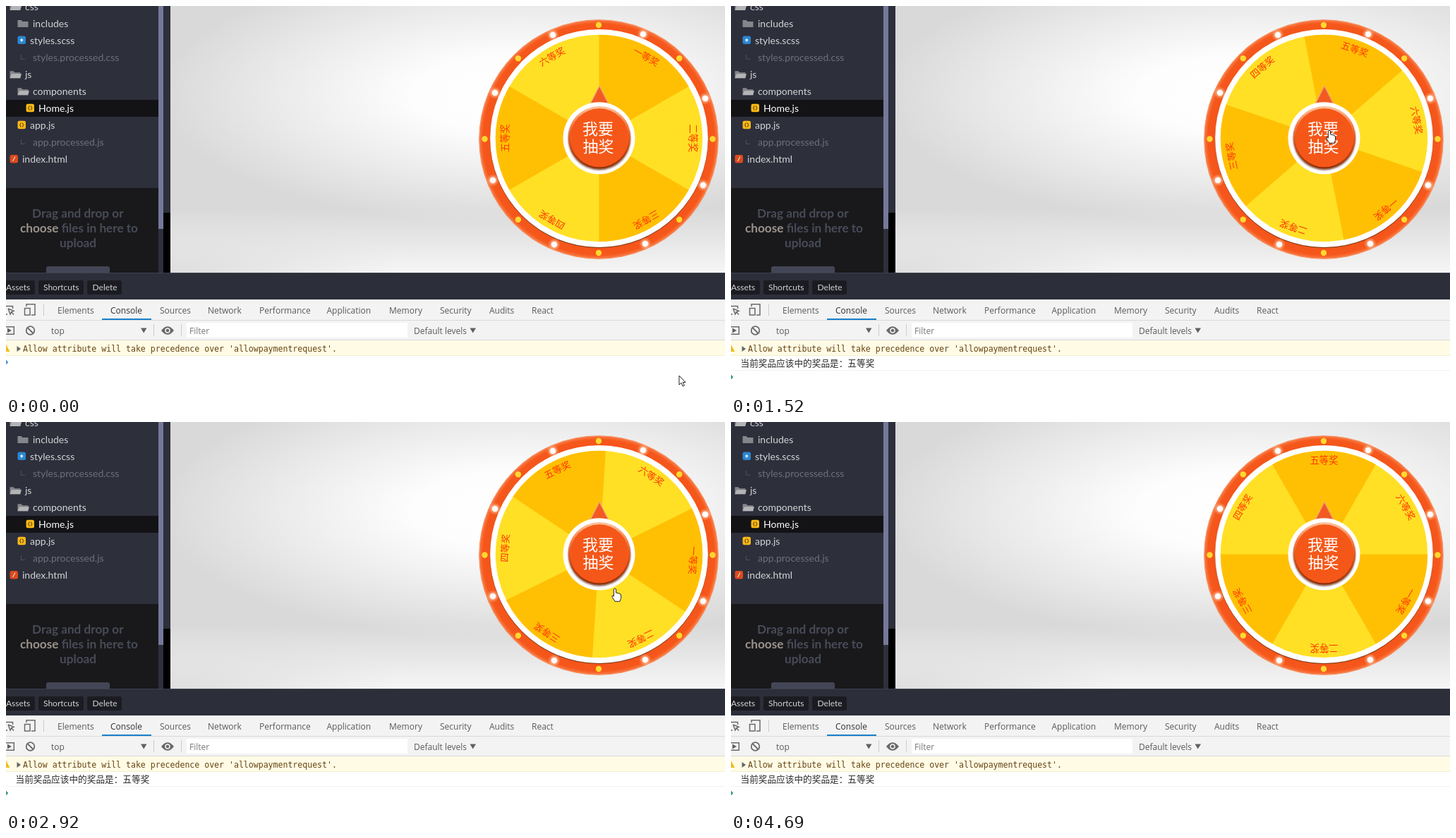
An HTML page that plays this animation: 1019 px wide and 550 px high, repeating every 4760 ms.

```html
<!DOCTYPE html>
<html lang="zh">
<head>
<meta charset="utf-8">
<title>Prize wheel</title>
<style>
html, body { margin: 0; width: 100%; height: 100%; overflow: hidden; background: #fff; }
svg { display: block; width: 1019px; height: 550px; }
.lato { font-family: Lato, sans-serif; font-size: 14px; fill: #d3d3d6; }
.dim { fill: #6d707c; }
.small { font-size: 12px; }
.drop { font-size: 17.2px; font-weight: 700; fill: #484b58; }
.ui { font: 12px "Open Sans", sans-serif; fill: #5a5a5a; }
.mono { font: 11.55px "DejaVu Sans Mono", monospace; fill: #664411; }
.cjk { font-family: "Noto Sans CJK SC", "Noto Sans CJK", sans-serif; }
</style>
</head>
<body>
<svg id="stage" viewBox="0 0 1019 550" xmlns="http://www.w3.org/2000/svg">
  <defs>
    <radialGradient id="wall" gradientUnits="userSpaceOnUse" cx="0" cy="0" r="1"
      gradientTransform="translate(730 125) scale(515 185)">
      <stop offset="0" stop-color="#fff"/><stop offset=".3" stop-color="#fdfdfd"/>
      <stop offset=".7" stop-color="#e9e9e9"/><stop offset="1" stop-color="#d9d9d9"/>
    </radialGradient>
    <linearGradient id="floor" x2="0" y2="1">
      <stop offset="0" stop-color="#f4f4f4" stop-opacity="0"/>
      <stop offset="1" stop-color="#f6f6f6"/>
    </linearGradient>
    <radialGradient id="corner" gradientUnits="userSpaceOnUse" cx="0" cy="0" r="1"
      gradientTransform="translate(233 378) scale(330 90)">
      <stop offset="0" stop-color="#dedede"/>
      <stop offset="1" stop-color="#dedede" stop-opacity="0"/>
    </radialGradient>
    <radialGradient id="rim" gradientUnits="userSpaceOnUse" cx="840" cy="189" r="170">
      <stop offset=".9" stop-color="#f4541a"/><stop offset=".965" stop-color="#f6571b"/>
      <stop offset="1" stop-color="#f8834f"/>
    </radialGradient>
    <radialGradient id="glow">
      <stop offset="0" stop-color="#fff"/><stop offset=".4" stop-color="#fff" stop-opacity=".9"/>
      <stop offset=".55" stop-color="#ffd9b8" stop-opacity=".5"/>
      <stop offset="1" stop-color="#ffb080" stop-opacity="0"/>
    </radialGradient>
    <linearGradient id="edge" x2="0" y2="1">
      <stop offset="0" stop-color="#ffc49c"/><stop offset=".3" stop-color="#f77a43"/>
      <stop offset=".7" stop-color="#c9450f"/><stop offset="1" stop-color="#8c310a"/>
    </linearGradient>
    <filter id="soft"><feGaussianBlur stdDeviation="1.3"/></filter>
  </defs>

  <g id="page">
    <rect x="233" width="786" height="378" fill="url(#wall)"/>
    <rect x="233" y="288" width="786" height="90" fill="url(#floor)"/>
    <rect x="233" y="288" width="786" height="90" fill="url(#corner)"/>
  </g>

  <g id="sidebar">
    <rect width="233" height="378" fill="#2d2f3b"/>
    <rect y="133" width="216" height="24" fill="#131316"/>
    <rect y="258" width="216" height="120" fill="#19191b"/>
    <rect x="216" width="7" height="316" fill="#74789a"/>
    <rect x="223" y="293" width="10" height="85" fill="#000"/>
    <rect x="57" y="369" width="90" height="12" rx="3" fill="#434656"/>
    <g class="lato drop">
      <text x="37" y="300">Drag and drop or</text>
      <text x="20" y="321"><tspan fill="#9b938d">choose</tspan> files in here to</text>
      <text x="76" y="342">upload</text>
    </g>
  </g>

  <g id="toolbar">
    <rect y="378" width="1019" height="38" fill="#2c2e3a"/>
    <path d="M0 378.5H1019" stroke="#3f414d"/>
  </g>

  <g id="devtools">
    <rect y="416" width="1019" height="134" fill="#fff"/>
    <rect y="416" width="1019" height="58" fill="#f3f3f3"/>
    <path d="M0 445.5H1019M0 473.5H1019" stroke="#d8d8d8"/>
    <path d="M53.5 422V439M209.5 451V468M248.5 451V468" stroke="#ccc"/>
    <rect x="136" y="443" width="70" height="2" fill="#1b7fcc"/>
    <rect x="256" y="449" width="313" height="21" fill="#fff"/>
    <g fill="none" stroke="#6a6a6a" stroke-width="1.5">
      <path d="M0 425.5H9.5V429M0 437H2"/>
      <path d="M3 429L11 432.2L7.6 433.8L11 437.5M3 429L6 437L7.6 433.8"/>
      <path d="M29 426V422.8H41V438H36M26.5 428.5H34V438H26.5Z"/>
      <circle cx="34.5" cy="460" r="5.8" stroke-width="1.8"/>
      <path d="M30.5 456L38.5 464" stroke-width="1.8"/>
      <path d="M0 454.7H11.3V465.3H0"/>
      <path d="M221 460Q229 450 237 460Q229 470 221 460Z" fill="#6a6a6a"/>
      <circle cx="229" cy="460" r="3" fill="#6a6a6a" stroke="#f3f3f3"/>
    </g>
    <path d="M2 456.5L8 460L2 463.5ZM191 456.5H199.5L195.2 463.5ZM657.5 456.5H666L661.7 463.5Z" fill="#606060"/>
    <text class="ui" x="64" y="465">top</text>
    <text class="ui" x="260" y="465" style="fill:#777">Filter</text>
    <text class="ui" x="578" y="464.5">Default levels</text>
    <rect y="474" width="1019" height="21" fill="#fffbe5"/>
    <path d="M0 495.5H1019" stroke="#f4efcf"/>
    <path d="M0 480L5.5 490H-5Z" fill="#f3bb1c"/>
    <path d="M15.5 482L21 486L15.5 490Z" fill="#666"/>
    <text class="mono" x="24" y="490">Allow attribute will take precedence over 'allowpaymentrequest'.</text>
    <g id="log">
      <text class="cjk" x="13.5" y="510.5" font-size="12.67" fill="#2a2a2a">当前奖品应该中的奖品是：五等奖</text>
      <path d="M0 516.5H1019" stroke="#f0f0f0"/>
    </g>
    <path id="prompt" d="M-1 -3L2 0L-1 3" fill="none" stroke-width="1.6"/>
  </g>

  <g id="frame">
    <circle cx="840" cy="189" r="169.8" fill="url(#rim)"/>
    <circle cx="840" cy="189" r="169" fill="none" stroke="#f99a6c" stroke-opacity=".7"/>
    <circle cx="840.5" cy="188.5" r="154.4" fill="#74340f"/>
    <circle cx="840.5" cy="187.5" r="154.4" fill="#fff"/>
  </g>
  <g id="wheel"></g>
  <g id="button">
    <path d="M841 113.5L853.5 138H828.5Z" fill="#f25a22" stroke="#f0a184" stroke-width="1.2"/>
    <circle cx="840.5" cy="187.3" r="51" fill="#fff"/>
    <circle cx="841" cy="188.5" r="44.2" fill="#6b2c10" opacity=".75" filter="url(#soft)"/>
    <circle cx="841" cy="186.3" r="44.2" fill="url(#edge)"/>
    <circle cx="841" cy="186.8" r="41.5" fill="#f55718"/>
    <g class="cjk" font-size="22" fill="#fff" text-anchor="middle">
      <text x="839" y="181.5">我要</text>
      <text x="839.5" y="207">抽奖</text>
    </g>
  </g>
  <path id="arrow" d="M0 0V13L3 10.2L5.2 15L7.4 14L5.2 9.4H9Z" fill="#fff" stroke="#222"/>
  <path id="hand" d="M-1.6 1Q0 -1 1.6 1V6L6 7Q8.6 7.6 8.6 10V13.5L7 18.3H0L-4 12Q-4.4 9.6 -2.6 10L-1.6 11.2Z" fill="#fff" stroke="#222"/>
</svg>

<script>
const LOOP = 4760, START = 750, STEP = 77.25, TURN = 810;
const $ = id => document.getElementById(id);

function add(parent, tag, attrs, text) {
  const el = document.createElementNS('http://www.w3.org/2000/svg', tag);
  for (const name in attrs) el.setAttribute(name, attrs[name]);
  if (text) el.textContent = text;
  $(parent).appendChild(el);
  return el;
}

// File tree: label, x, icon kind
const files = [
  ['css', 27, 'open'], ['includes', 38, 'folder'], ['styles.scss', 34, 'style'],
  ['styles.processed.css', 38, 'child'], ['js', 27, 'open'], ['components', 38, 'open'],
  ['Home.js', 46, 'script'], ['app.js', 34, 'script'],
  ['app.processed.js', 38, 'child'], ['index.html', 23, 'markup']
];
const badges = {
  style: ['#2b86cf', '#fff', 'M-2 -1L2 1M-2 1L2 -1M0 -2.5V2.5'],
  script: ['#fab817', '#3a2c00', 'M-1 -3Q-4 0 -1 3M1 -3Q4 0 1 3'],
  markup: ['#db4a1d', '#fff', 'M1.7 -3.2L-1.7 3.2']
};
files.forEach(([label, x, kind], i) => {
  const y = 1 + i * 24.05;
  if (badges[kind]) {
    const [fill, stroke, d] = badges[kind], left = x - 17.5;
    add('sidebar', 'rect', { x: left, y: y - 6.5, width: 11.5, height: 11.5, rx: 2.5, fill });
    add('sidebar', 'path', { d, stroke, fill: 'none', transform: `translate(${left + 5.7} ${y - .7})` });
  } else if (kind === 'child') {
    add('sidebar', 'path', { d: `M21.5 ${y - 4}V${y + 2}H27`, fill: 'none', stroke: '#50535f' });
  } else {
    const left = x - 21.5;
    add('sidebar', 'path', { d: `M${left} ${y + 5}v-10h5l2 2h8v8z`, fill: '#85868b' });
    if (kind === 'open')
      add('sidebar', 'path', { d: `M${left} ${y + 5}l2.5 -6h14l-2 6z`, fill: '#b4b4b7' });
  }
  const tone = kind === 'child' ? ' dim' : '';
  const el = add('sidebar', 'text', { x, y: y + 5, class: 'lato' + tone }, label);
  if (label === 'Home.js') el.style.fill = '#fff';
});

[['Assets', -6, 47, 0], ['Shortcuts', 46, 64, 53], ['Delete', 115, 49, 122.5]].forEach(([label, x, width, tx]) => {
  add('toolbar', 'rect', { x, y: 389, width, height: 20, rx: 2, fill: '#1b1c21' });
  add('toolbar', 'text', { x: tx, y: 403, class: 'lato small' }, label);
});

[['Elements', 73], ['Console', 148], ['Sources', 218], ['Network', 286], ['Performance', 359],
 ['Application', 454.5], ['Memory', 543], ['Security', 615], ['Audits', 685], ['React', 745]]
  .forEach(([label, x]) => {
    const el = add('devtools', 'text', { x, y: 436, class: 'ui' }, label);
    if (label === 'Console') el.style.fill = '#333';
  });

for (let i = 0; i < 8; i++) {
  const a = i * Math.PI / 4;
  add('frame', 'circle', { cx: 840 + 161.5 * Math.sin(a), cy: 188.5 - 161.5 * Math.cos(a), r: 4.2, fill: '#ffd92e' });
}
[[775, 41], [903, 40], [693, 123], [991, 131], [690, 247], [988, 254], [777, 338], [906, 337]]
  .forEach(([cx, cy]) => {
    add('frame', 'circle', { cx, cy, r: 9, fill: 'url(#glow)' });
    add('frame', 'circle', { cx, cy, r: 3.8, fill: '#fff' });
  });

const R = 146.7, half = R / 2, high = R * Math.sqrt(3) / 2;
add('wheel', 'circle', { r: R, fill: '#ffe025' });
[...'一二三四五六'].forEach((rank, i) => {
  if (i % 2 === 0)
    add('wheel', 'path', {
      d: `M0 0V${-R}A${R} ${R} 0 0 1 ${high} ${-half}Z`, fill: '#ffc004', transform: `rotate(${i * 60})`
    });
  add('wheel', 'text', {
    y: -128.6, class: 'cjk', 'font-size': 13.3, 'text-anchor': 'middle',
    fill: '#ff3600', transform: `rotate(${i * 60 + 30})`
  }, rank + '等奖');
});

// Linear interpolation over rows of [time, ...values]
function track(rows, t) {
  let i = 1;
  while (i < rows.length - 1 && rows[i][0] < t) i++;
  const a = rows[i - 1], b = rows[i];
  const k = Math.min(1, Math.max(0, (t - a[0]) / (b[0] - a[0])));
  return a.slice(1).map((v, n) => v + (b[n + 1] - v) * k);
}

// The remaining turn is the fourth power of this value
const spin = [[750, 1], [1059, .9241], [1522.5, .8055], [2295, .562], [2913, .4245], [3453.75, .2933], [4685, 0]];
const approach = [[0, 954, 524], [125, 937, 440], [180, 905, 325], [235, 870, 225], [290, 848, 176]];
const leave = [[2836, 848, 176], [2913, 863, 236], [3067, 932, 368], [3222, 966, 488], [3376, 950, 523], [3453, 946, 542]];

function place(id, x, y, visible) {
  $(id).setAttribute('transform', `translate(${x} ${y})`);
  $(id).setAttribute('visibility', visible ? 'visible' : 'hidden');
}

function draw(time) {
  const clicked = time >= START;
  const t = clicked
    ? START + STEP * Math.floor((time - START) / STEP + .2)
    : time < 70 ? 0 : Math.min(290, 70 + 55 * Math.floor((time - 70) / 55));

  const [left] = track(spin, t);
  const angle = TURN * (1 - left ** 4);
  $('wheel').setAttribute('transform', `translate(840.5 187.4) rotate(${angle})`);

  $('log').setAttribute('visibility', clicked ? 'visible' : 'hidden');
  place('prompt', 0, clicked ? 526 : 505, true);
  $('prompt').setAttribute('stroke', clicked ? '#15924f' : '#2c82d6');

  const [x, y] = track(t < 2800 ? approach : leave, t);
  const pointing = t >= 290 && t < 2950;
  place('hand', x, y, pointing);
  place('arrow', x, y, !pointing && t < 3500);
}

const origin = performance.now();
function loop() {
  draw((performance.now() - origin) % LOOP);
  requestAnimationFrame(loop);
}
loop();
</script>
</body>
</html>
```
